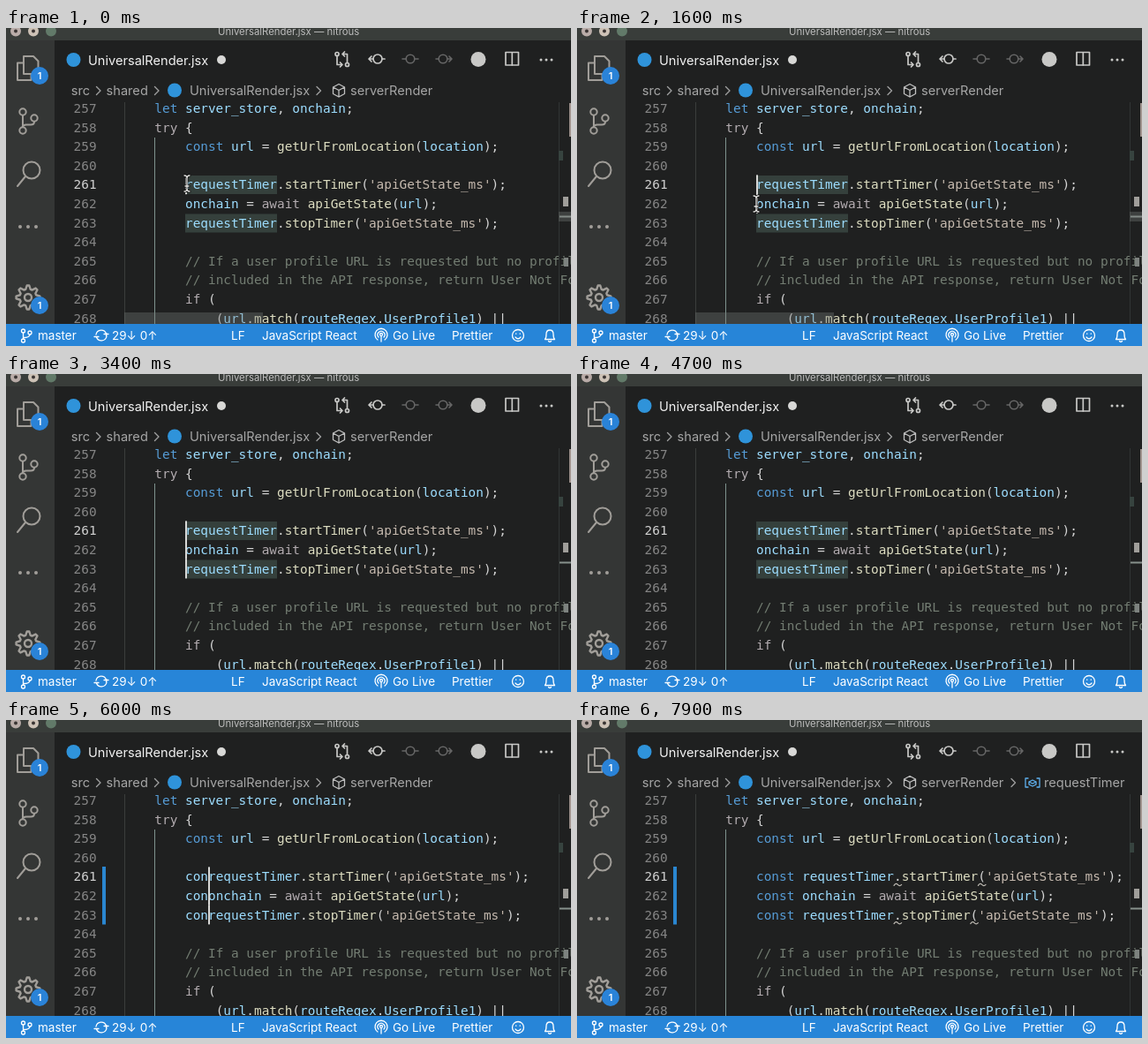
An HTML page that plays this animation: 640 by 360 pixels, repeating every 8 s.

```html
<!DOCTYPE html>
<html lang="en">
<head>
<meta charset="utf-8">
<title>Editor</title>
<style>
  html, body { margin: 0; width: 100%; height: 100%; overflow: hidden; background: #1f2020; }
  svg { display: block; width: 100vw; height: 100vh; }
  text { white-space: pre; }
  .code { font: 14.4px "DejaVu Sans Mono", monospace; }
  .ui { font: 14.6px Inter, sans-serif; fill: #a6a6a6; }
  .title { font: 11.35px Inter, sans-serif; fill: #bdbdbd; }
  .badge { font: 600 11px Inter, sans-serif; fill: #fff; text-anchor: middle; }
  .status { font: 13.5px Inter, sans-serif; fill: #fff; }
  .line { fill: none; stroke-linecap: round; stroke-linejoin: round; }
</style>
</head>
<body>
<svg viewBox="0 0 640 360" xmlns="http://www.w3.org/2000/svg">
  <rect width="640" height="360" fill="#1f2020"/>
  <rect width="55" height="336" fill="#343635"/>
  <rect width="640" height="14" fill="#393d3a"/>
  <circle cx="11" cy="3.5" r="6" fill="#b9aca8"/>
  <circle cx="31" cy="3.5" r="6" fill="#cdc2b6"/>
  <circle cx="51" cy="3.5" r="6" fill="#627a69"/>
  <g fill="#3a3433"><circle cx="11" cy="3.5" r="2"/><circle cx="31" cy="3.5" r="2"/></g>
  <text class="title" x="240" y="8">UniversalRender.jsx — nitrous</text>

  <!-- activity bar -->
  <g class="line" stroke="#a19e99" stroke-width="2">
    <path d="M20 32H31L36.5 37.5V52H20ZM20 39.500H13V59H28.500V52"/>
    <circle cx="19" cy="95" r="3.7"/><circle cx="19" cy="116" r="3.7"/><circle cx="32" cy="102" r="3.7"/>
    <path d="M19 99V112M32 106Q32 109.5 28 109.5H23Q19 109.5 19 112"/>
    <circle cx="29" cy="161" r="9.5"/><path d="M22 168L13 179"/>
    <path id="gear" stroke-width="2.4"/><circle cx="25" cy="305" r="4" stroke-width="2.4"/>
  </g>
  <g fill="#a19e99"><circle cx="16" cy="225" r="2"/><circle cx="25" cy="225" r="2"/><circle cx="34" cy="225" r="2"/></g>
  <g fill="#2a83d8"><circle cx="38" cy="54" r="10"/><circle cx="38" cy="314" r="10"/></g>
  <g class="badge"><text x="38" y="58">1</text><text x="38" y="318">1</text></g>

  <!-- tab and toolbar -->
  <circle cx="76.5" cy="36" r="8" fill="#2f93da"/>
  <text class="ui" x="93" y="41.5" style="fill:#f2f2f2">UniversalRender.jsx</text>
  <circle cx="244" cy="36" r="5" fill="#d8d8d6"/>
  <g class="line" stroke="#c8c8c6" stroke-width="1.7">
    <circle cx="375" cy="29.5" r="2"/><circle cx="386.5" cy="41.5" r="2"/>
    <path d="M375 31.5V41.500H380.500M378.500 39L381 41.5L378.500 44M386.5 39.5V29.5H381.5M383.5 27L381 29.5L383.5 32"/>
    <circle cx="421" cy="35" r="5"/><path d="M416 35H411M414 32L411 35L414 38M426 35H429"/>
    <rect x="566" y="27.5" width="14.5" height="14.5"/><path d="M573.3 28V42"/>
  </g>
  <g class="line" stroke="#666" stroke-width="1.6">
    <circle cx="458" cy="35" r="4.8"/><path d="M449 35H453M463 35H467"/>
    <circle cx="495" cy="35" r="4.8"/><path d="M487 35H490M500 35H505M502 32L505 35L502 38"/>
  </g>
  <circle cx="535" cy="35.5" r="8.5" fill="#c8c8c6"/>
  <g fill="#c8c8c6"><circle cx="606" cy="36" r="1.5"/><circle cx="612" cy="36" r="1.5"/><circle cx="618" cy="36" r="1.5"/></g>

  <!-- breadcrumbs -->
  <g class="ui">
    <text x="73.800" y="76">src</text><text x="113.6" y="76">shared</text>
    <text x="208" y="76">UniversalRender.jsx</text><text x="390" y="76">serverRender</text>
  </g>
  <circle cx="191" cy="70.5" r="8" fill="#2f93da"/>
  <g class="line" stroke="#a0a0a0" stroke-width="1.3">
    <path d="M102.5 66.5L107 71L102.5 75.5M168.5 66.5L173 71L168.5 75.5M352 66.5L356.5 71L352 75.5"/>
    <path d="M377 63.5L383.5 67V74.5L377 78L370.5 74.5V67ZM370.5 67L377 70.5L383.5 67M377 70.5V78" stroke="#c0c0c0"/>
  </g>
  <g id="crumb">
    <path class="line" d="M492 66.5L496.5 71L492 75.5" stroke="#a0a0a0" stroke-width="1.3"/>
    <path class="line" d="M511 66H508V76H511M521 66H524V76H521M512 70L516 68L520 70V73L516 75L512 73ZM512 70L516 72L520 70" stroke="#5fb0ee" stroke-width="1.3"/>
    <text class="ui" x="529" y="76">requestTimer</text>
  </g>

  <!-- editor -->
  <path d="M134.5 84V335" stroke="#3b3d3c"/>
  <path d="M168.5 124V335" stroke="#7f938d"/>
  <g id="marks" fill="#35403c"><rect x="203" y="167" width="104" height="21"/><rect x="203" y="210.5" width="104" height="21"/></g>
  <rect id="bars" x="109" y="166" width="4" height="65.5" fill="#2a86d0"/>
  <g id="code" class="code"></g>
  <g id="squiggles" class="line" stroke="#bdb9b2" stroke-width="1.2"></g>
  <g id="carets" fill="#d8d8d6"></g>

  <!-- overview ruler and scrollbars -->
  <path d="M626.5 84V335" stroke="#313534"/>
  <rect x="626" y="139" width="5" height="11" fill="#37433f"/>
  <rect x="631" y="191" width="6" height="11" fill="#a09e9a"/>
  <path d="M627 213.5H640" stroke="#87918c" stroke-width="2"/>
  <rect x="632" y="260" width="5" height="10" fill="#7d827f"/>
  <rect x="638" y="85" width="2" height="38" fill="#a0938e"/>
  <g id="sliders" fill="#797f7c" opacity=".35">
    <rect x="134" y="322" width="157" height="13"/><rect x="626" y="208" width="14" height="11"/>
  </g>
  <g id="hover" class="code" opacity=".25">
    <rect x="204" y="107" width="272" height="60" fill="#1f2020"/>
    <text x="215" y="125.4" fill="#d4d4d4">(parameter) requestTimer: any</text>
    <text x="215" y="159.4" fill="#d4d4d4"><tspan font-style="italic">@param</tspan> requestTimer</text>
  </g>
  <g id="mouse" class="line"></g>

  <!-- status bar -->
  <rect y="335" width="640" height="25" fill="#2785d8"/>
  <g class="line" stroke="#fff" stroke-width="1.3">
    <circle cx="19.5" cy="343" r="2"/><circle cx="19.5" cy="354" r="2"/><circle cx="27" cy="345" r="2"/>
    <path d="M19.5 345V352M27 347Q27 350.5 19.5 350.5"/>
    <path d="M102 347A6 6 0 0 1 113.5 346M114 349A6 6 0 0 1 102.5 350M111 346.5H116M113.5 348.5L114 346M100 349.5H105"/>
    <circle cx="425" cy="347" r="1.5"/><path d="M425 349V355M422 350A4 4 0 1 1 428 350M421 353A7 7 0 1 1 429 353"/>
    <circle cx="580" cy="348" r="6.5"/><path d="M577 350Q580 353.5 583 350M577.8 346V346.3M582.2 346V346.3"/>
    <path d="M610.5 352.5Q612 351 612 346.5Q612 342 616 342Q620 342 620 346.5Q620 351 621.5 352.5ZM614.5 354.5Q616 356 617.5 354.5"/>
  </g>
  <g class="status">
    <text x="36" y="353">master</text><text x="120" y="353">29↓ 0↑</text><text x="255" y="353">LF</text>
    <text x="290" y="353">JavaScript React</text><text x="438" y="353">Go Live</text><text x="505" y="353">Prettier</text>
  </g>
</svg>
<script>
const LOOP = 8000, LEFT = 203, CHAR = 8.669, ROW = 21.6, FIRST = 257;
const $ = id => document.getElementById(id);
const centre = n => 91 + (n - FIRST) * ROW;

const colors = {
  k: '#569cd6', v: '#9cdcfe', f: '#dcdcc0', s: '#c5b9ae',
  c: '#737d72', q: '#b3acb0', p: '#d4d4d4'
};

// Each token is a colour key, a colon and its text; "~" splits tokens.
const lines = [
  [-4, 'k:let ~v:server_store~p:, ~v:onchain~p:;'],
  [-4, 'q:try ~p:{'],
  [0, 'k:const ~v:url~p: = ~f:getUrlFromLocation~p:(~v:location~p:);'],
  [0, ''],
  [0, "v:requestTimer~p:.~f:startTimer~p:(~s:'apiGetState_ms'~p:);"],
  [0, 'v:onchain~p: = ~q:await ~f:apiGetState~p:(~v:url~p:);'],
  [0, "v:requestTimer~p:.~f:stopTimer~p:(~s:'apiGetState_ms'~p:);"],
  [0, ''],
  [0, 'c:// If a user profile URL is requested but no profile is'],
  [0, 'c:// included in the API response, return User Not Found'],
  [0, 'q:if ~p:('],
  [4, 'p:(~v:url~p:.~f:match~p:(~v:routeRegex~p:.~v:UserProfile1~p:) ||']
];

const word = 'const ';
const keys = [5600, 5740, 5880, 6080, 6200, 6360];
const cursorAdds = [0, 1300, 2100];
const resets = [...cursorAdds, ...keys];
const exit = 3100, parsed = 7300;

const path = [
  [0, 205, 176], [400, 205, 176], [900, 203, 194], [1300, 203, 199],
  [1600, 203, 199], [2000, 210, 224], [2750, 210, 224], [exit, 400, 380]
];

function add(parent, tag, attrs) {
  const el = document.createElementNS('http://www.w3.org/2000/svg', tag);
  for (const name in attrs) el.setAttribute(name, attrs[name]);
  return parent.appendChild(el);
}

function paint(el, tokens) {
  el.textContent = '';
  for (const token of tokens.split('~')) {
    add(el, 'tspan', { fill: colors[token[0]] }).textContent = token.slice(2);
  }
}

const show = (id, on) => { $(id).style.display = on ? '' : 'none'; };

const rows = lines.map(([indent, tokens], i) => {
  const n = FIRST + i, y = centre(n) + 5;
  add($('code'), 'text', { x: 76.6, y, fill: n === 261 ? '#d0d0d0' : '#858585' }).textContent = n;
  const row = add($('code'), 'text', { x: LEFT + indent * CHAR, y });
  if (tokens) paint(row, tokens);
  return row;
});

const carets = [261, 262, 263].map(n =>
  add($('carets'), 'rect', { y: centre(n) - 11, width: 2, height: ROW + 0.2 }));

for (const [n, cols] of [[261, [18, 29]], [263, [18, 28]]]) {
  for (const col of cols) {
    add($('squiggles'), 'path', { d: `M${LEFT + col * CHAR} ${centre(n) + 10}q2.2 -3.5 4.3 -1t4.3 0` });
  }
}

const beam = 'M-3 -9Q0 -9 0 -6Q0 -9 3 -9M0 -6V6M-3 9Q0 9 0 6Q0 9 3 9M-2 3H2';
add($('mouse'), 'path', { d: beam, stroke: '#111', 'stroke-width': 3 });
add($('mouse'), 'path', { d: beam, stroke: '#e4e4e2', 'stroke-width': 1.3 });

let teeth = '';
for (let i = 0; i < 32; i++) {
  const a = (i - 0.5) * Math.PI / 16, r = i % 4 < 2 ? 13.5 : 9.5;
  teeth += `${i ? 'L' : 'M'}${25 + r * Math.cos(a)} ${305 + r * Math.sin(a)}`;
}
$('gear').setAttribute('d', teeth + 'Z');

function mouseAt(t) {
  const i = path.findIndex(p => p[0] > t);
  if (i < 0) return path[path.length - 1].slice(1);
  const [t0, x0, y0] = path[i - 1], [t1, x1, y1] = path[i];
  const u = (t - t0) / (t1 - t0), e = u * u * (3 - 2 * u);
  return [x0 + (x1 - x0) * e, y0 + (y1 - y0) * e];
}

let shown = 0;
function draw(t) {
  const typed = keys.filter(k => k <= t).length;
  if (typed !== shown) {
    const prefix = typed ? `${typed < 5 ? 'v' : 'k'}:${word.slice(0, typed)}~` : '';
    for (let i = 4; i < 7; i++) paint(rows[i], prefix + lines[i][1]);
    shown = typed;
  }

  const last = resets.filter(r => r <= t).pop();
  const lit = (t - last) % 1000 < 500;
  carets.forEach((caret, i) => {
    caret.setAttribute('x', LEFT + typed * CHAR);
    caret.style.display = lit && t >= cursorAdds[i] ? '' : 'none';
  });

  const [x, y] = mouseAt(t);
  $('mouse').setAttribute('transform', `translate(${x} ${y})`);
  show('mouse', t < exit);
  show('sliders', t < exit);
  show('hover', t >= 880 && t < 990);
  show('marks', !typed);
  show('bars', t >= 5800);
  show('squiggles', t >= parsed);
  show('crumb', t >= parsed);
}

function tick() {
  draw(performance.now() % LOOP);
  requestAnimationFrame(tick);
}
tick();
</script>
</body>
</html>
```
